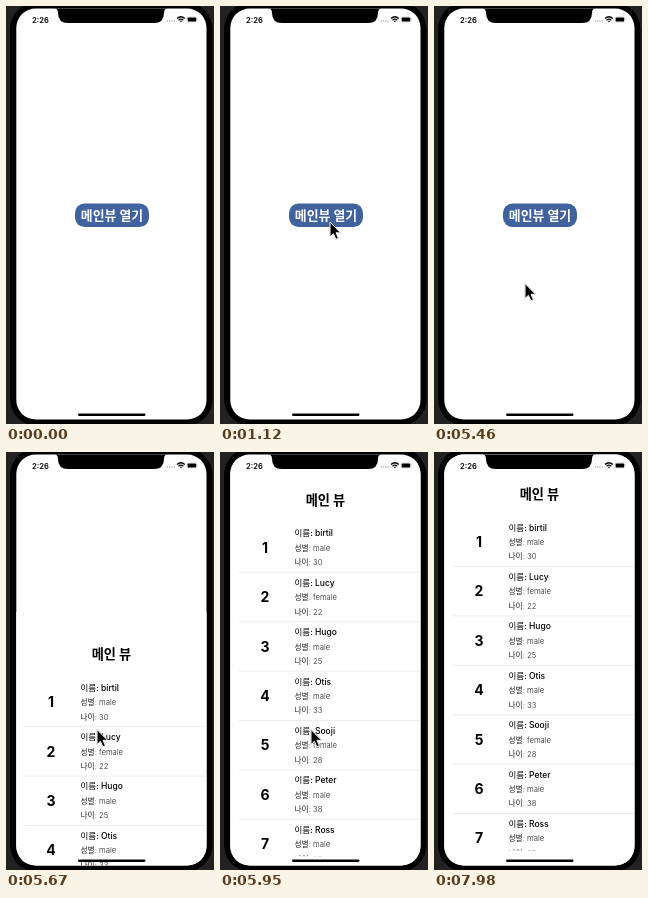
An HTML page for the animation above (9310 ms loop, 208 by 418 pixels).

```html
<!DOCTYPE html>
<html lang="ko">
<head>
<meta charset="utf-8">
<style>
  html, body { margin: 0; width: 100%; height: 100%; overflow: hidden; background: #222; }
  svg { display: block; width: 100%; height: 100%; }
  text { font-family: Inter, "Noto Sans CJK KR", "Noto Sans CJK", sans-serif; }
  .big { font-size: 13.2px; font-weight: 700; text-anchor: middle; }
  #label { font-size: 12.9px; }
  .rank { font-size: 14px; font-weight: 700; text-anchor: middle; }
  .name { font-size: 8.5px; font-weight: 500; }
  .info { font-size: 7.7px; font-weight: 300; fill: #222; }
</style>
</head>
<body>
<svg viewBox="0 0 208 418">
  <defs>
    <clipPath id="screen"><rect x="10.3" y="2.4" width="190.2" height="411.2" rx="19.5"/></clipPath>
    <clipPath id="safe"><rect x="10" y="50" width="191" height="348.5"/></clipPath>
  </defs>
  <rect width="208" height="418" fill="#222"/>
  <rect x="4" y="-4" width="202.5" height="424" rx="27"/>
  <g clip-path="url(#screen)">
    <rect width="208" height="418" fill="#fff"/>
    <rect x="69" y="197.5" width="74" height="23.5" rx="9.5" fill="#40629e"/>
    <text id="label" class="big" x="106" y="213.8">메인뷰 열기</text>
    <g id="sheet">
      <rect width="208" height="420" fill="#fff"/>
      <text class="big" x="105.5" y="47">메인 뷰</text>
      <g id="list" clip-path="url(#safe)"></g>
    </g>
    <path d="M47 0V2q5 0 5 5q0 10 10 10h86q10 0 10-10q0-5 5-5V0z"/>
    <text x="26" y="16.5" font-size="7.6" font-weight="600">2:26</text>
    <g fill="#aaa">
      <circle cx="161.5" cy="15" r=".75"/><circle cx="163.7" cy="15" r=".75"/>
      <circle cx="165.9" cy="15" r=".75"/><circle cx="168.1" cy="15" r=".75"/>
    </g>
    <g fill="none" stroke="#000" stroke-width="1.3">
      <path d="M171 12.6q3.9-3.6 7.8 0M172.5 14.2q2.4-2.1 4.8 0"/>
      <path d="M173.9 15l1 1l1-1z" fill="#000" stroke-width=".4"/>
    </g>
    <rect x="181.2" y="10.9" width="9.4" height="5.2" rx="1.4" fill="#fff" stroke="#aaa" stroke-width=".4"/>
    <rect x="181.7" y="11.4" width="8.4" height="4.2" rx=".9"/>
    <path d="M191.4 12.6v1.8" stroke="#aaa" stroke-width=".6"/>
    <rect x="72" y="407.6" width="67.5" height="2.3" rx="1.15"/>
  </g>
  <path id="cursor" d="M0 0V15L3.4 11.8L5.9 17.3L8.4 16.2L6 10.8H10.6Z" stroke="#fff" stroke-width="1"
    style="filter:drop-shadow(0 .6px .6px #0006)"/>
</svg>
<script>
const LOOP = 9310, TICK = 70, PITCH = 49.4;
const $ = id => document.getElementById(id);

const people = [
  ['birtil', 'male', 30], ['Lucy', 'female', 22], ['Hugo', 'male', 25], ['Otis', 'male', 33],
  ['Sooji', 'female', 28], ['Peter', 'male', 38], ['Ross', 'male', 29]
];
$('list').innerHTML = people.map(([name, sex, age], i) => `
  <g transform="translate(0 ${i * PITCH})">
    <text class="rank" x="45" y="95">${i + 1}</text>
    <text class="name" x="74.5" y="78.5">이름: ${name}</text>
    <text class="info" x="74.5" y="93">성별: ${sex}</text>
    <text class="info" x="74.5" y="107.4">나이: ${age}</text>
    <path d="M19 114.5H201" stroke="#e4e4e4" stroke-width=".7"/>
  </g>`).join('');

const easeOut = p => 1 - (1 - p) ** 2;
const smooth = p => p * p * (3 - 2 * p);

// time, x, y, easing towards this point
const path = [
  [70, 26, 397], [700, 120, 203, easeOut], [980, 110, 223, smooth],
  [1120, 110, 216, smooth], [1820, 110, 216, smooth], [2170, 91, 277.5, smooth]
];

function cursorAt(t) {
  const k = path.findIndex(p => p[0] >= t);
  if (k < 1) return path[k < 0 ? path.length - 1 : 0].slice(1, 3);
  const [t0, x0, y0] = path[k - 1], [t1, x1, y1, ease] = path[k];
  const p = ease((t - t0) / (t1 - t0));
  return [x0 + (x1 - x0) * p, y0 + (y1 - y0) * p];
}

// critically damped spring that lifts the sheet
function sheetOffset(t) {
  if (t < 5600) return 420;
  if (t >= 6090) return 0;
  const s = (t - 5530) * 0.0149;
  return 418 * (1 + s) * Math.exp(-s);
}

function draw(now) {
  const t = Math.floor((now % LOOP) / TICK) * TICK;
  $('label').setAttribute('fill', t >= 1470 && t < 5460 ? '#c9d3e5' : '#fff');
  $('sheet').setAttribute('transform', `translate(0 ${sheetOffset(t)})`);
  $('cursor').setAttribute('transform', `translate(${cursorAt(t)})`);
  $('cursor').setAttribute('opacity', t < 70 || t >= 7980 ? 0 : t >= 7910 ? 0.45 : 1);
}

const start = performance.now();
function frame() {
  draw(performance.now() - start);
  requestAnimationFrame(frame);
}
frame();
</script>
</body>
</html>
```
